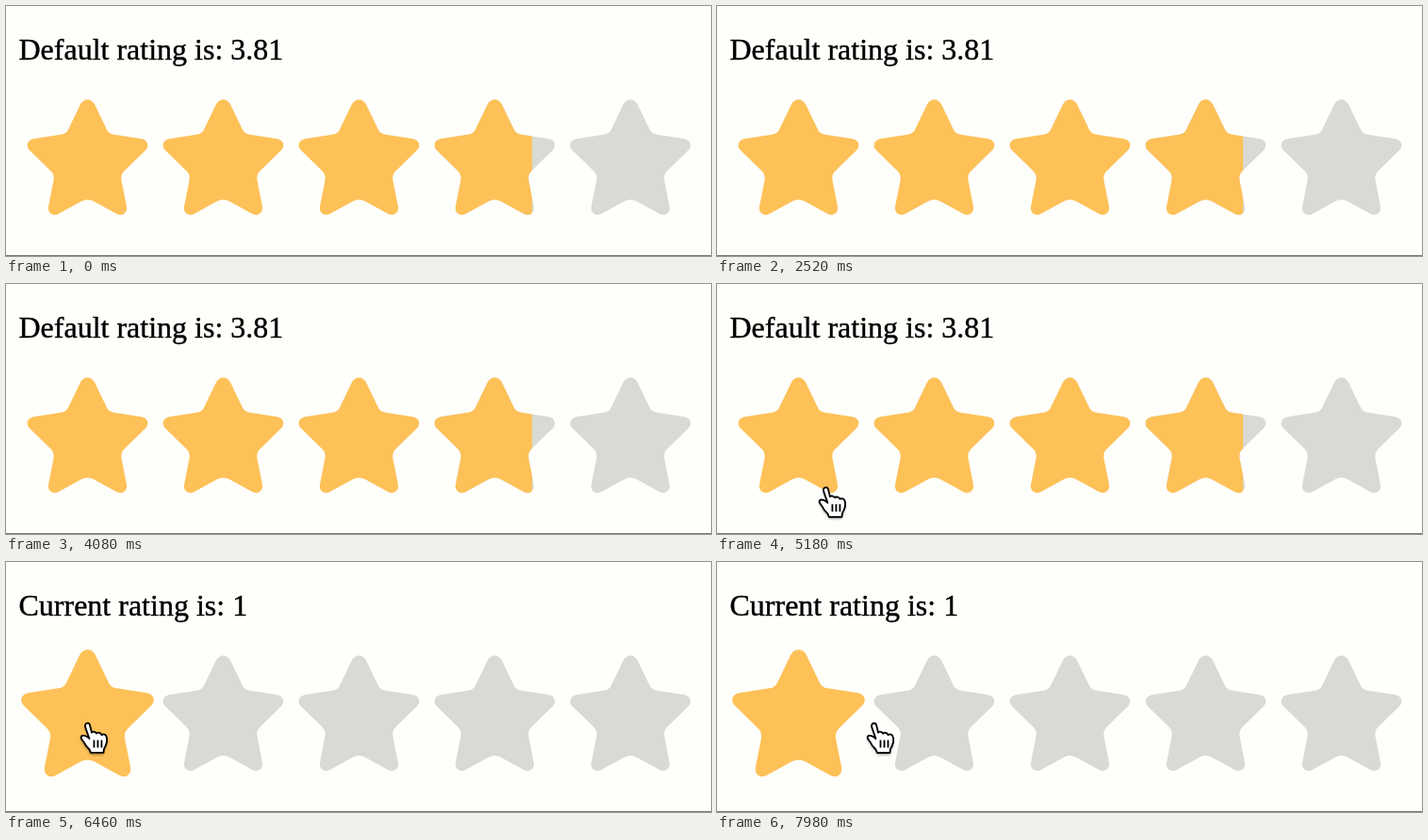
These frames come from a looping animation (748x266 px, 8 s). An HTML page with a canvas:

```html
<!DOCTYPE html>
<html lang="en">
<head>
<meta charset="utf-8">
<title>Star rating</title>
<style>
html, body { margin: 0; width: 748px; height: 266px; overflow: hidden; background: #fefefb; }
canvas { display: block; }
</style>
</head>
<body>
<canvas width="748" height="266"></canvas>
<script>
const ctx = document.querySelector('canvas').getContext('2d');
const LOOP = 8000, HOVER = 5200, GROW = 200, CLICK = 6460;
const GOLD = '#fdc158', PALE = '#dadad4';
const STAR_X = 86.5, STAR_Y = 161;

// Left half of a star around x = 0, mirrored to make the whole
const half = new Path2D('M0 99C-3 99-6 101-7.5 104L-20 130Q-22 135.5-28 136.3L-57 140.8' +
  'C-64 142-66 148.5-61.5 153L-39 175Q-35 179-36 185L-41.5 213' +
  'C-42.5 219.5-37 223.5-31.5 221L-6 207Q-3 205.5 0 205.5Z');
const star = new Path2D(half);
star.addPath(half, new DOMMatrix([-1, 0, 0, 1, 0, 0]));

const hand = new Path2D('M9 1.5C6 1.5 5.5 4 6.5 6.5L10.5 18C8 15.5 4 13.5 2 15.5C.5 17.5 3 19 4.5 21.5' +
  'C6 25 8 27 10.5 29.5L12 33H25.5L26 29C29 24 30 19 28.5 15.5C27.5 13 25 13 23.5 14' +
  'C22.5 11.5 19.5 11 18 12.5C17 10.5 14 10 13 11.5L11.2 4Q10.5 1.5 9 1.5Z');
const creases = new Path2D('M15.5 19.5V27.5M19.5 19.5V27.5M23.5 19.5V27.5');

// Pointer path: time, x, y
const route = [
  [4900, 135, 267], [5180, 107, 215], [5400, 87, 184], [5620, 79, 171],
  [6400, 78, 170], [7300, 77, 169], [7440, 49, 166], [7540, 40, 162],
  [7680, 65, 160], [7860, 144, 165], [7940, 160, 170], [7980, 158, 170], [LOOP, 158, 170]
];

function pointerAt(t) {
  const i = route.findIndex(p => p[0] > t);
  if (i < 1) return null;
  const [t0, x0, y0] = route[i - 1], [t1, x1, y1] = route[i];
  const k = (t - t0) / (t1 - t0);
  return [x0 + (x1 - x0) * k, y0 + (y1 - y0) * k];
}

function drawStar(i, fill, scale) {
  ctx.save();
  ctx.translate(STAR_X + 144 * i, STAR_Y + 0.5);
  ctx.scale(scale, scale);
  ctx.translate(0, -STAR_Y);
  if (fill < 1) {
    ctx.fillStyle = PALE;
    ctx.fill(star);
  }
  if (fill > 0) {
    ctx.beginPath();
    ctx.rect(-64, 90, 128 * fill, 140);
    if (fill < 1) ctx.clip();
    ctx.fillStyle = GOLD;
    ctx.fill(star);
  }
  ctx.restore();
}

function drawHand(x, y) {
  ctx.save();
  ctx.translate(x, y);
  ctx.lineJoin = 'round';
  ctx.lineWidth = 1.8;
  ctx.strokeStyle = '#000';
  ctx.fillStyle = '#fff';
  ctx.shadowColor = 'rgba(0,0,0,.4)';
  ctx.shadowBlur = 3;
  ctx.shadowOffsetY = 2;
  ctx.fill(hand);
  ctx.shadowColor = 'transparent';
  ctx.stroke(hand);
  ctx.stroke(creases);
  ctx.restore();
}

function drawLabel(text) {
  ctx.font = '32px "Liberation Serif", Times, serif';
  ctx.fillStyle = ctx.strokeStyle = '#000';
  ctx.lineWidth = 0.4;
  ctx.fillText(text, 13.5, 57);
  ctx.strokeText(text, 13.5, 57);
}

function draw(now) {
  const t = now % LOOP;
  const rating = t < HOVER ? 3.81 : 1;
  const k = Math.min(1, Math.max(0, (t - HOVER) / GROW));
  const grow = 1 + 0.1 * k * (2 - k);

  ctx.fillStyle = '#fefefb';
  ctx.fillRect(0, 0, 748, 266);
  ctx.fillStyle = '#777';
  ctx.fillRect(0, 265, 748, 1);

  drawLabel(t < CLICK ? 'Default rating is: 3.81' : 'Current rating is: 1');
  for (let i = 0; i < 5; i++) {
    drawStar(i, Math.min(1, Math.max(0, rating - i)), i ? 1 : grow);
  }
  const pointer = pointerAt(t);
  if (pointer) drawHand(...pointer);
  requestAnimationFrame(draw);
}
requestAnimationFrame(draw);
</script>
</body>
</html>
```
